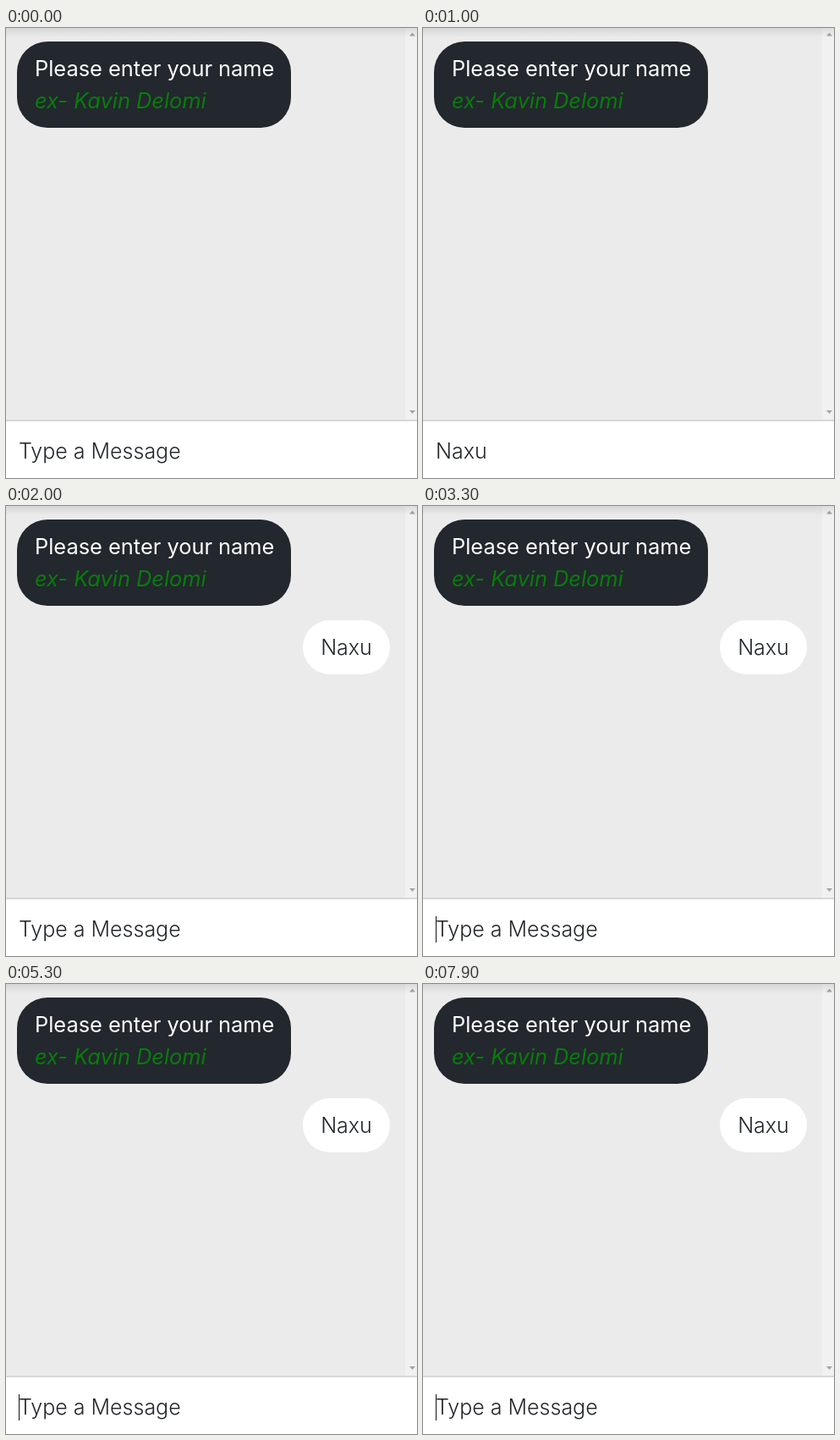
Animation of 486x532 px, one loop 8000 ms. Source, as an HTML page:

```html
<!DOCTYPE html>
<html lang="en">
<head>
<meta charset="utf-8">
<title>Chat</title>
<style>
  html, body { margin: 0; width: 100%; height: 100%; overflow: hidden; background: #fff; }
  svg { display: block; }
  text { font: 340 25px Inter, "Liberation Sans", sans-serif; font-optical-sizing: none; fill: #23262b; }
  .ask { font-size: 25.4px; font-weight: 420; fill: #fff; }
  .hint { font-size: 25.4px; font-style: italic; font-weight: 400; fill: #077d0a; }
</style>
</head>
<body>
<svg width="486" height="532" viewBox="0 0 486 532">
  <defs>
    <linearGradient id="shade" x2="0" y2="1">
      <stop stop-color="#000" stop-opacity=".09"/>
      <stop offset="1" stop-color="#000" stop-opacity="0"/>
    </linearGradient>
  </defs>
  <rect width="486" height="464" fill="#ebebeb"/>
  <rect x="472" width="14" height="463" fill="#f1f1f1"/>
  <path d="M477 9.5l3.5-4 3.5 4zM477 452l3.5 4 3.5-4z" fill="#a3a3a3"/>
  <rect width="486" height="11" fill="url(#shade)"/>
  <rect y="463" width="486" height="2" fill="#d8d8d8"/>

  <rect x="13" y="16" width="324" height="102" rx="36" fill="#23272e"/>
  <text class="ask" x="34" y="57">Please enter your name</text>
  <text class="hint" x="34" y="95">ex- Kavin Delomi</text>

  <g id="reply">
    <rect x="351" y="135" width="103" height="64" rx="32" fill="#fff"/>
    <text id="replyText" x="402.5" y="176" text-anchor="middle"></text>
  </g>

  <text id="field" x="15" y="509"></text>
  <rect id="caret" y="485" width="1" height="31" fill="#111"/>
</svg>
<script>
  const LOOP = 8000, SEND = 1200;
  const NAME = "Naxu", PLACEHOLDER = "Type a Message";
  const keyTimes = [100, 200, 400, 500];
  // Caret visible during each [on, off) span
  const caretSpans = [[100, 1000], [1200, 1700], [2200, 2700], [3200, 3800],
    [4300, 4800], [5300, 5800], [6200, 6800], [7300, LOOP]];

  const [reply, replyText, field, caret] =
    ["reply", "replyText", "field", "caret"].map(id => document.getElementById(id));
  const show = (el, on) => el.setAttribute("visibility", on ? "visible" : "hidden");
  replyText.textContent = NAME;

  function draw(t) {
    const sent = t >= SEND;
    const typed = sent ? "" : NAME.slice(0, keyTimes.filter(k => t >= k).length);
    field.textContent = typed || PLACEHOLDER;
    caret.setAttribute("x", typed ? Math.round(16 + field.getComputedTextLength()) : 15);
    show(caret, caretSpans.some(([on, off]) => t >= on && t < off));
    show(reply, sent);
  }

  let start;
  function tick(now) {
    start ??= now;
    draw((now - start) % LOOP);
    requestAnimationFrame(tick);
  }
  draw(0);
  requestAnimationFrame(tick);
</script>
</body>
</html>
```
